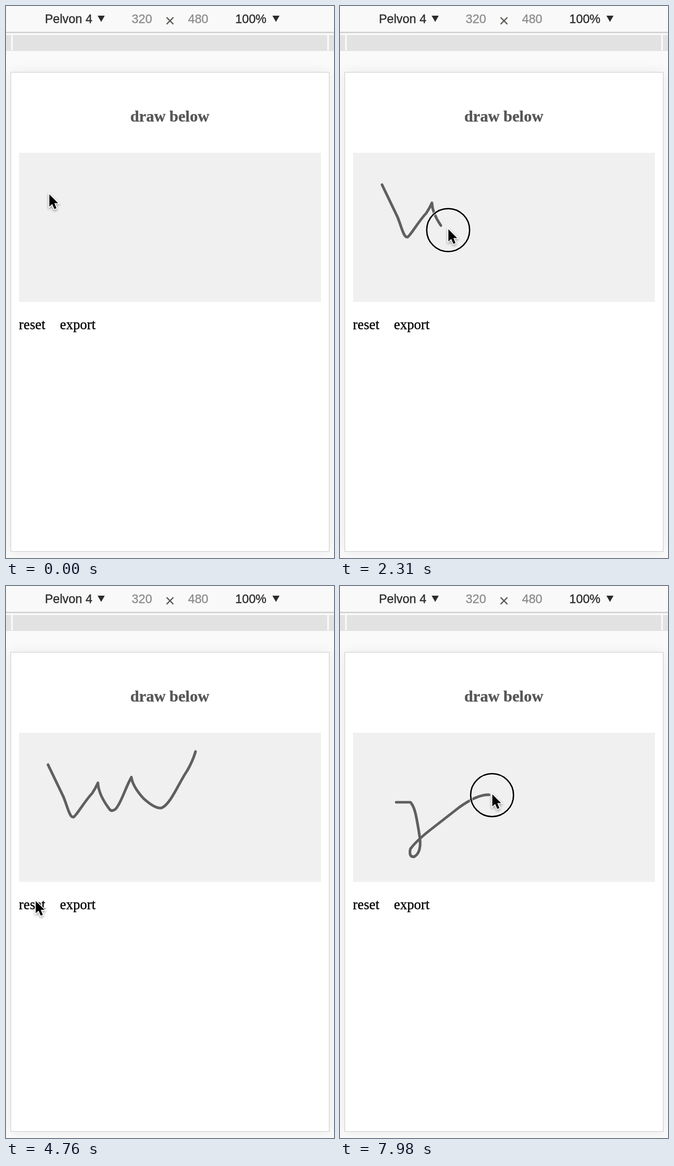
An HTML page with a canvas for the animation above (8 s loop, 578 by 970 pixels).

```html
<!DOCTYPE html>
<html lang="en">
<head>
<meta charset="utf-8">
<title>Draw below</title>
<style>
html, body { margin: 0; width: 100%; height: 100%; overflow: hidden; background: #fafafa; }
canvas { display: block; }
</style>
</head>
<body>
<canvas id="stage" width="578" height="970"></canvas>
<script>
const ctx = document.getElementById('stage').getContext('2d');
const LOOP = 8000, STEP = 70;
const SANS = '21.5px "Liberation Sans", Arial, sans-serif';
const SERIF = '"Liberation Serif", Times, serif';

const linear = u => u;
const smooth = u => u * u * (3 - 2 * u);

// The pointer follows path d between two times.
function move(start, end, d, ease = smooth) {
  const path = document.createElementNS('http://www.w3.org/2000/svg', 'path');
  path.setAttribute('d', d);
  const total = path.getTotalLength();
  const length = t => total * ease(Math.max(0, Math.min(1, (t - start) / (end - start))));
  return { start, length, shape: new Path2D(d), at: t => path.getPointAtLength(length(t)) };
}

const zigzag = move(1340, 3380, `M74 314 L101 370 C108 386 112 408 119 406
  C124 404 137 380 152 364 Q158 355 162 346 Q163 367 183 393 Q187 397 193 392
  C203 382 210 355 221 336 Q223 352 242 373 Q263 392 274 390
  C290 384 305 345 319 325 Q329 308 334 291`, linear);
const loop = move(6850, 7930, `M99 380 H124 Q131 387 135 409 Q139 430 141 445
  Q143 470 130 476 Q121 476 124 462 Q136 446 165 424 L210 389
  Q246 363 268 367.5`, linear);

const moves = [
  move(300, 1100, 'M76 332.5 L74 314'),
  zigzag,
  move(3640, 4640, 'M334 291 Q130 420 52 555'),
  move(5180, 5390, 'M52 555 L64 551'),
  move(5740, 6090, 'M64 551 L122 383'),
  move(6230, 6580, 'M122 383 L99 380'),
  loop
];
const resetAt = 5530;
const presses = [[1190, 3640], [5390, resetAt], [6650, LOOP]];

function rect(x, y, w, h, fill) {
  ctx.fillStyle = fill;
  ctx.fillRect(x, y, w, h);
}

// A hairline outline gives the heavier text smoothing.
function text(str, x, y, font, color, align = 'left') {
  ctx.font = font;
  ctx.textAlign = align;
  ctx.fillStyle = ctx.strokeStyle = color;
  ctx.lineWidth = 0.35;
  ctx.fillText(str, x, y);
  ctx.strokeText(str, x, y);
}

function shadow(color, blur, dy) {
  ctx.shadowColor = color;
  ctx.shadowBlur = blur;
  ctx.shadowOffsetY = dy;
}

function toolbar() {
  rect(0, 0, 578, 46, '#f9f9f9');
  rect(0, 45.5, 578, 2, '#c9c9c9');
  rect(0, 51, 578, 28, '#e2e2e2');
  for (const x of [9, 566]) rect(x, 51, 3, 27, '#fafafa');
  text('Pelvon 4', 68.5, 30, SANS, '#2b2b2b');
  text('320', 221.5, 30, SANS, '#8c8c8c');
  text('480', 320.7, 30, SANS, '#8c8c8c');
  text('100%', 404, 30, SANS, '#2b2b2b');
  ctx.fillStyle = '#2b2b2b';
  for (const x of [161.5, 469.5]) ctx.fill(new Path2D(`M${x} 17 h12.5 l-6.25 11 z`));
  ctx.strokeStyle = '#5a5852';
  ctx.lineWidth = 2.2;
  ctx.stroke(new Path2D('M283 20 l12 12 m0 -12 l-12 12'));
}

function page() {
  ctx.save();
  shadow('rgba(0,0,0,.07)', 20, 0);
  rect(8, 116, 562, 843, '#cfcfcf');
  ctx.restore();
  rect(9, 117, 560, 841, '#fff');
  text('draw below', 288.5, 203, 'bold 28px ' + SERIF, '#555', 'center');
  rect(23, 258, 532, 262, '#f0f0f0');
  text('reset', 22.8, 568, '24.6px ' + SERIF, '#000');
  text('export', 95, 568, '24.6px ' + SERIF, '#000');
}

// Ink trails the pointer by one step.
function ink(stroke, t) {
  const drawn = stroke.length(t - STEP);
  if (!drawn) return;
  ctx.save();
  ctx.setLineDash([drawn, 2000]);
  ctx.strokeStyle = '#5f5f5f';
  ctx.lineWidth = 4.7;
  ctx.lineCap = ctx.lineJoin = 'round';
  ctx.stroke(stroke.shape);
  ctx.restore();
}

function ring(x, y) {
  ctx.beginPath();
  ctx.arc(x, y, 37.8, 0, Math.PI * 2);
  for (const [width, color] of [[5, 'rgba(255,255,255,.7)'], [2.5, '#000']]) {
    ctx.lineWidth = width;
    ctx.strokeStyle = color;
    ctx.stroke();
  }
}

const arrowShape = new Path2D('M0 0 V21.5 L5 17 L8.8 25.8 L12.5 24.2 L8.8 15.6 L15.5 15.5 Z');
function arrow(x, y) {
  ctx.save();
  ctx.translate(x + 0.4, y - 1.5);
  ctx.lineWidth = 3;
  ctx.strokeStyle = '#fff';
  shadow('rgba(0,0,0,.4)', 4, 2);
  ctx.stroke(arrowShape);
  shadow('transparent', 0, 0);
  ctx.fillStyle = '#000';
  ctx.fill(arrowShape);
  ctx.restore();
}

function draw(t) {
  rect(0, 0, 578, 970, '#fafafa');
  page();
  toolbar();
  ink(t < resetAt ? zigzag : loop, t);
  const current = moves.filter(m => m.start <= t).pop() || moves[0];
  const { x, y } = current.at(t);
  if (presses.some(([down, up]) => t >= down && t < up)) ring(x, y);
  arrow(x, y);
}

const origin = performance.now();
function tick() {
  const t = (performance.now() - origin) % LOOP;
  draw(Math.floor(t / STEP) * STEP);
  requestAnimationFrame(tick);
}
tick();
</script>
</body>
</html>
```
